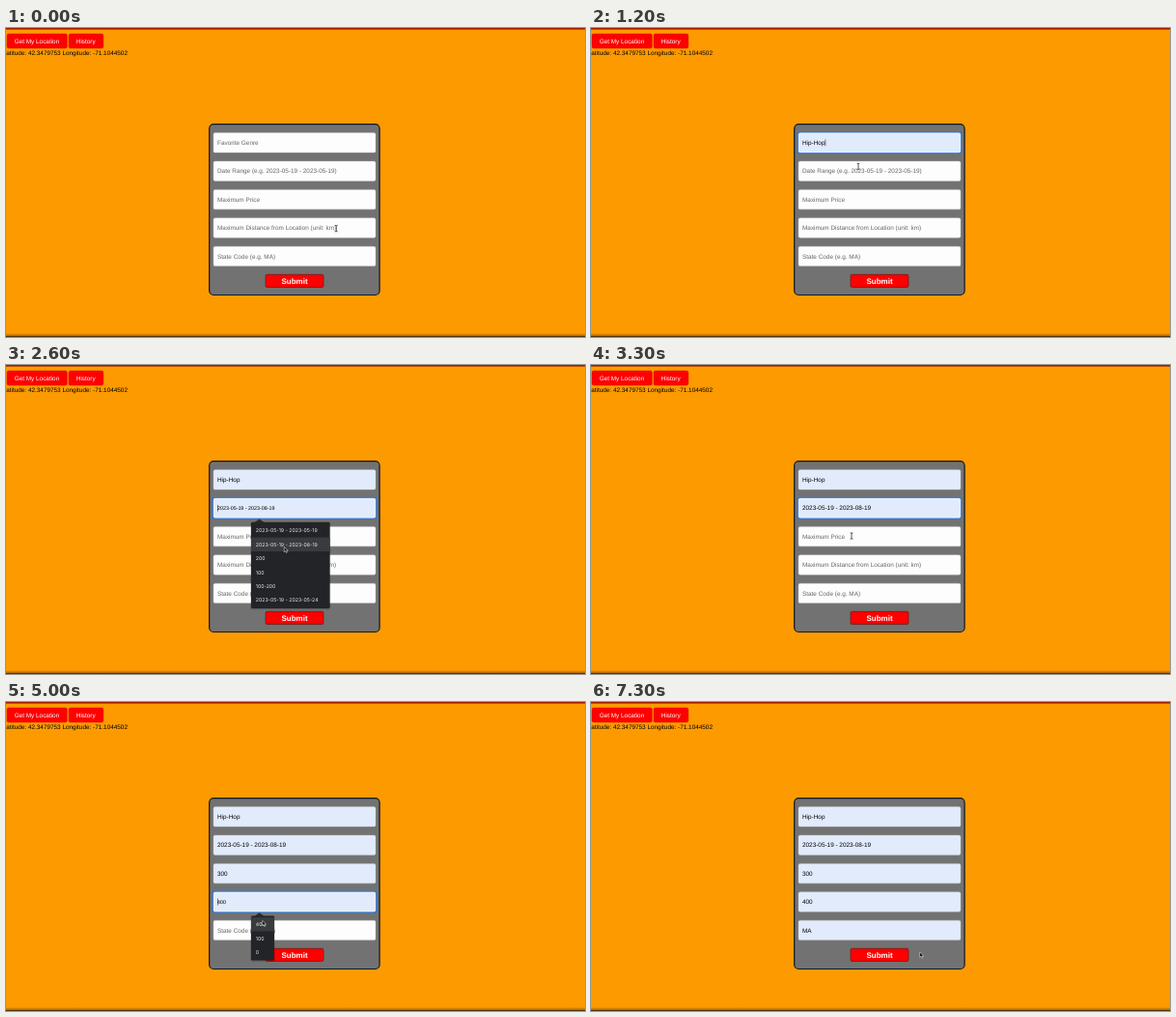
An HTML page that plays this animation: 600x320 px, repeating every 8000 ms.

```html
<!DOCTYPE html>
<html lang="en">
<head>
<meta charset="utf-8">
<title>Event search form</title>
<style>
  html, body { margin: 0; width: 100%; height: 100%; overflow: hidden; background: #fc9a00; }
  svg { display: block; width: 600px; height: 320px; }
  text { font: 6.4px "Liberation Sans", Arial, sans-serif; text-rendering: geometricPrecision; white-space: pre; }
  .menu { font: 5.2px Inter, sans-serif; }
</style>
</head>
<body>
<svg viewBox="0 0 600 320">
  <defs>
    <linearGradient id="shade" x2="0" y2="1">
      <stop offset="0" stop-color="#502800" stop-opacity="0"/>
      <stop offset="1" stop-color="#502800" stop-opacity=".45"/>
    </linearGradient>
  </defs>
  <rect width="600" height="320" fill="#fc9a00"/>
  <rect width="600" height="1.6" fill="#a51c04"/>
  <rect y="316" width="600" height="3" fill="url(#shade)"/>
  <rect y="319" width="600" height="1" fill="#4a3412"/>
  <g fill="#f00" stroke="#c80000" stroke-width=".4">
    <rect x="1" y="6" width="62.3" height="15" rx="1.8"/>
    <rect x="65" y="6" width="35.8" height="15" rx="1.8"/>
  </g>
  <text x="8.7" y="15.9" fill="#fff">Get My Location</text>
  <text x="72.8" y="15.9" fill="#fff">History</text>
  <text x="-3.4" y="27.9">Latitude: 42.3479753 Longitude: -71.1044502</text>
  <rect x="210.7" y="99.7" width="176.4" height="176.8" rx="4.5" fill="#727272" stroke="#14161f" stroke-width="1.2"/>
  <rect x="269" y="255.3" width="60" height="13.2" rx="1.6" fill="#f00" stroke="#5a1010" stroke-width=".6"/>
  <text x="299" y="264.7" text-anchor="middle" fill="#fff" style="font-size:8px;font-weight:bold">Submit</text>
  <g id="live"></g>
</svg>
<script>
const LOOP = 8000, STEP = 100, ROW = 14.4, MENU_X = 254;

// Each field is focused at `open`, filled at `pick` and left at `blur`.
const fields = [
  { hint: 'Favorite Genre', options: ['Hip-Hop', 'Rock', 'Jazz'],
    choice: 0, width: 33, open: 300, pick: 800, blur: 1600 },
  { hint: 'Date Range (e.g. 2023-05-19 - 2023-05-19)',
    options: ['2023-05-19 - 2023-05-19', '2023-05-19 - 2023-08-19', '200', '100', '100-200', '2023-05-19 - 2023-05-24'],
    choice: 1, width: 81.6, open: 1600, pick: 2800, blur: 3500 },
  { hint: 'Maximum Price', options: ['300', '100', '500'],
    choice: 0, width: 24, open: 3500, pick: 4300, blur: 4700 },
  { hint: 'Maximum Distance from Location (unit: km)', options: ['400', '100', '0'],
    choice: 0, width: 24, open: 4700, pick: 5300, blur: 5700 },
  { hint: 'State Code (e.g. MA)', options: ['MA'],
    choice: 0, width: 24, open: 5700, pick: 6400, blur: 7000 }
];
fields.forEach((f, i) => f.y = 118.8 + 29.4 * i);

// Pointer path: time, x, y
const path = [
  [0, 342.3, 207.6], [100, 308, 132], [200, 308, 132], [300, 300, 121], [500, 275, 138],
  [600, 272, 141], [800, 272, 141], [1200, 277, 143.4], [1600, 275, 148], [1900, 285, 168],
  [2300, 288.3, 188.3], [2800, 288.3, 188.3], [3300, 270, 177], [3500, 268, 178],
  [3800, 267.5, 199.3], [4300, 267.5, 199.3], [4600, 266, 207], [4700, 266, 209],
  [4900, 265.7, 226.3], [5300, 265.7, 226.3], [5600, 266, 236], [5700, 266, 238],
  [5900, 266.2, 255], [6400, 266.2, 255], [6800, 300, 261], [7000, 300, 261],
  [7300, 340.7, 259], [LOOP, 340.7, 259]
];

const live = document.getElementById('live');
const rect = (x, y, w, h, fill, more = '') =>
  `<rect x="${x}" y="${y}" width="${w}" height="${h}" fill="${fill}" ${more}/>`;
const label = (x, y, s, fill, more = '') =>
  `<text x="${x}" y="${y}" fill="${fill}" ${more}>${s}</text>`;

const ruler = document.createElement('canvas').getContext('2d');
ruler.font = '64px "Liberation Sans", Arial, sans-serif';
const textWidth = s => ruler.measureText(s).width / 10;

function pointerAt(t) {
  const i = path.findIndex(p => p[0] > t);
  const [t0, x0, y0] = path[i - 1], [t1, x1, y1] = path[i];
  const k = (t - t0) / (t1 - t0);
  return { x: x0 + (x1 - x0) * k, y: y0 + (y1 - y0) * k };
}

function hoveredRow(f, p) {
  const row = Math.floor((p.y - f.y - 15.9) / ROW);
  const inside = p.x > MENU_X && p.x < MENU_X + f.width && row >= 0 && row < f.options.length;
  return inside ? row : -1;
}

function drawField(f, t, row) {
  const focused = t >= f.open && t < f.blur, picked = t >= f.pick;
  const preview = !picked && row >= 0;
  const value = picked ? f.options[f.choice] : preview ? f.options[row] : '';
  const ring = focused
    ? rect(214.3, f.y - 10.9, 169.4, 21.8, 'none', 'rx="2" stroke="#2a78dc" stroke-width="1.3"') +
      rect(215.3, f.y - 9.9, 167.4, 19.8, 'none', 'rx="1.4" stroke="#f6faff" stroke-width=".6"')
    : '';
  const blinkOn = (t - (picked ? f.pick : f.open)) % 1000 < 500;
  const caretX = 219.2 + (picked ? textWidth(value) : 0);
  return rect(215, f.y - 10.2, 168, 20.4, value ? '#e1ebfc' : '#fdfdfd', 'rx="1.6" stroke="#c9c9c9" stroke-width=".4"') +
    ring +
    label(219, f.y + (preview ? 1.9 : 2.2), value || f.hint, value ? '#000' : '#666', preview ? 'style="font-size:5.35px"' : '') +
    (focused && blinkOn ? rect(caretX, f.y - 3.4, .5, 6.8, '#000') : '');
}

function drawMenu(f, row) {
  const top = f.y + 14.6, h = f.options.length * ROW + 2.8;
  return rect(MENU_X - .6, top, f.width + 1.2, h + 1.2, '#000', 'rx="2" opacity=".2"') +
    `<path d="M257.5 ${top + .2}l5-3.6 5 3.6z" fill="#28292c"/>` +
    rect(MENU_X, top, f.width, h, '#232427', 'rx="1.4"') +
    (row >= 0 ? rect(MENU_X, top + 1.4 + row * ROW, f.width, ROW, '#3a3b3e') : '') +
    f.options.map((s, i) => label(258.8, f.y + 25.2 + i * ROW, s, '#ececec', 'class="menu"')).join('');
}

function drawPointer({ x, y }, overMenu) {
  const overField = x > 215 && x < 383 && fields.some(f => Math.abs(y - f.y) < 10.2);
  const beam = 'M-1.4-3.3Q0-3.3 0-2.4Q0-3.3 1.4-3.3M0-2.4V2.4M-1.4 3.3Q0 3.3 0 2.4Q0 3.3 1.4 3.3';
  const shape = overField && !overMenu
    ? `<path d="${beam}" fill="none" stroke="#fff" stroke-width="1.3" opacity=".6"/>
       <path d="${beam}" fill="none" stroke="#111" stroke-width=".7"/>`
    : '<path d="M0 0V5.4L1.3 4.2L2.2 6.2L3.1 5.8L2.2 3.9H3.9Z" fill="#000" stroke="#fff" stroke-width=".5"/>';
  return `<g transform="translate(${x} ${y})">${shape}</g>`;
}

function draw(t) {
  const p = pointerAt(t);
  const active = fields.find(f => t >= f.open && t < f.pick);
  const row = active ? hoveredRow(active, p) : -1;
  live.innerHTML = fields.map(f => drawField(f, t, f === active ? row : -1)).join('') +
    (active ? drawMenu(active, row) : '') + drawPointer(p, row >= 0);
}

const start = performance.now();
let shown = -1;
function tick() {
  const t = Math.floor((performance.now() - start) % LOOP / STEP) * STEP;
  if (t !== shown) draw(shown = t);
  requestAnimationFrame(tick);
}
tick();
</script>
</body>
</html>
```
